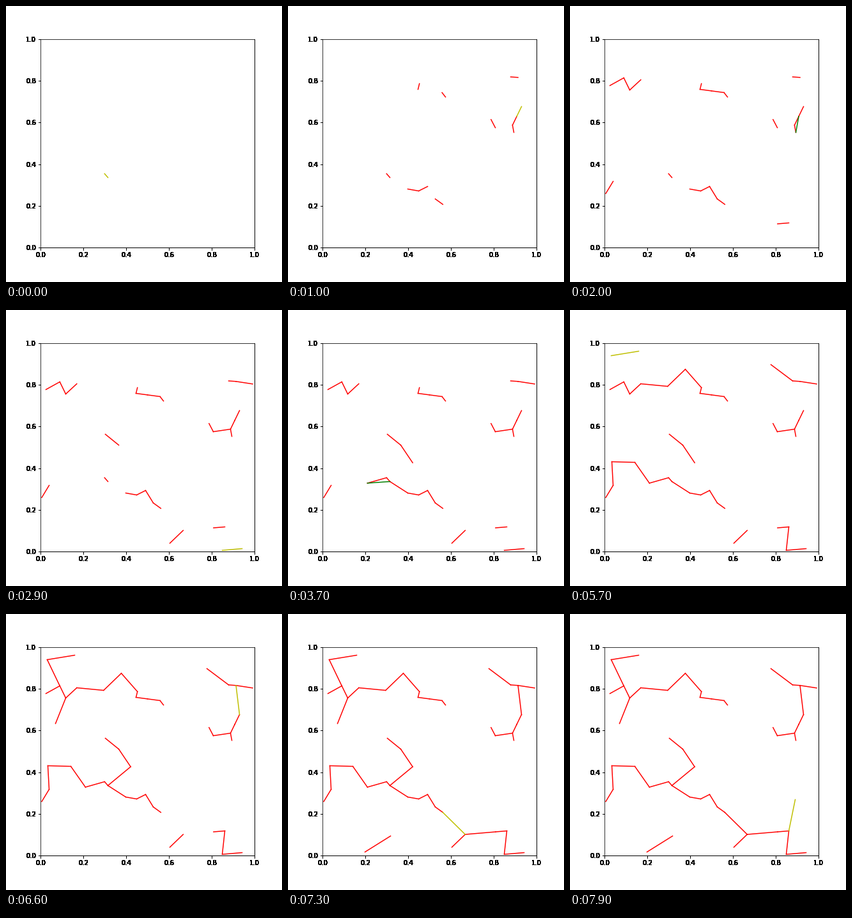
A matplotlib script for the animation above (8 s loop, 432 by 432 pixels).

```python
"""Kruskal's algorithm growing a minimum spanning forest over scattered points."""
from itertools import combinations

import matplotlib.pyplot as plt
import numpy as np
from matplotlib.animation import FuncAnimation
from matplotlib.collections import LineCollection

SIZE, DPI = 432, 72
FRAMES, INTERVAL = 80, 100
BOX = [0.125, 0.125, 0.775, 0.755]
TREE, KEPT, CYCLE = "r", "y", "g"


def between(p, q, t):
    return [p, p + (q - p) * t, q]


# Key points as x + yj, in stage pixels with y downwards
NODES = [
    # upper left
    62 + 124j, 83.7 + 112j, 93 + 131j, 110.3 + 115j, 152.3 + 119j,
    180 + 92.3j, 205.2 + 121j, *between(203 + 130j, 240.6 + 135j, 0.48),
    246 + 142j, 64 + 71j, 107 + 64j, 77 + 171j,
    # upper right
    314 + 85j, 348 + 110.5j, 359.5 + 111.3j, 385.5 + 115.3j,
    *between(365 + 156.9j, 350.9 + 186j, 0.53),
    353 + 197.3j, 324 + 190j, 317.3 + 177.2j,
    # centre and left
    155 + 194j, 176 + 211j, 194.6 + 238.6j,
    65 + 237j, 101 + 238j, 67 + 274j, 55.5 + 293j,
    123.8 + 270.5j, 153.8 + 262j, 159 + 268j, 187 + 286j, 204 + 289j,
    218 + 282j, 230 + 301.5j, 241.8 + 310j,
    # bottom
    *between(276.8 + 344.5j, 342 + 339j, 0.73), 256 + 364.5j,
    338 + 375.7j, 369 + 373j, 352 + 290j, 120 + 372j, 160 + 347j,
]


def to_data(nodes):
    """Pixel centres to axes coordinates."""
    z = np.array(nodes) + 0.5 + 0.5j
    stage = np.column_stack([z.real / SIZE, 1 - z.imag / SIZE])
    return (stage - BOX[:2]) / BOX[2:]


def kruskal(points):
    """Yield (edge, kept) for every pair, shortest first."""
    parent = list(range(len(points)))

    def root(i):
        while parent[i] != i:
            i = parent[i]
        return i

    def length(pair):
        return np.hypot(*(points[pair[0]] - points[pair[1]]))

    for a, b in sorted(combinations(range(len(points)), 2), key=length):
        ra, rb = root(a), root(b)
        parent[ra] = rb
        yield points[[a, b]], ra != rb


def harden(image, dpi):
    """Turn every touched pixel solid black, as on a one-bit alpha mask."""
    mask = np.zeros_like(image)
    mask[..., 3] = image[..., 3] > 0
    return mask, 0, 0


steps = [step for step, _ in zip(kruskal(to_data(NODES)), range(FRAMES))]

fig = plt.figure(figsize=(SIZE / DPI, SIZE / DPI), dpi=DPI, facecolor="white")
ax = fig.add_axes(BOX, xlim=(0, 1), ylim=(0, 1))
for part in (ax.xaxis, ax.yaxis, ax.spines["right"], ax.spines["bottom"]):
    part.set_agg_filter(harden)

lines = LineCollection([], linewidths=1.5, capstyle="projecting", zorder=2)
ax.add_collection(lines)


def draw(frame):
    edge, kept = steps[frame]
    tree = [e for e, ok in steps[:frame] if ok]
    lines.set_segments(tree + [edge])
    lines.set_color([TREE] * len(tree) + [KEPT if kept else CYCLE])
    return [lines]


anim = FuncAnimation(fig, draw, frames=FRAMES, interval=INTERVAL,
                     repeat=True, repeat_delay=0)
plt.show()
```
